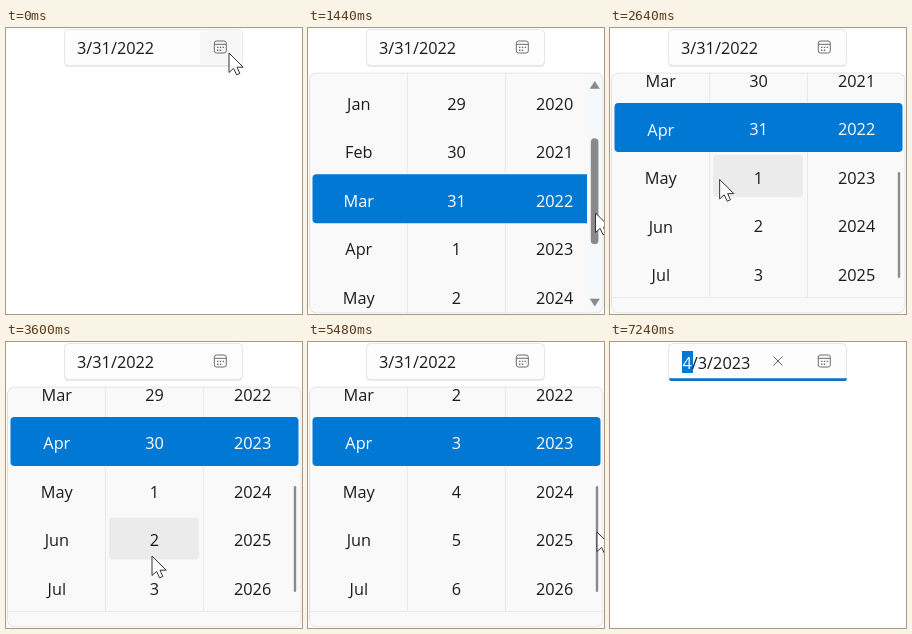
These frames come from a looping animation (296 px wide and 286 px high, 7.28 s). An HTML page:

```html
<!DOCTYPE html>
<html lang="en">
<head>
<meta charset="utf-8">
<title>Date picker</title>
<style>
  html, body { margin: 0; width: 100%; height: 100%; overflow: hidden; background: #fff; }
  svg { display: block; }
  text { font: 16.3px "Open Sans", "Noto Sans", sans-serif; }
  .mid { text-anchor: middle; }
  .line { stroke: #e9e9e9; fill: none; }
  .icon { stroke: #6a6a6a; fill: none; stroke-width: 1; }
</style>
</head>
<body>
<svg width="296" height="286" viewBox="0 0 296 286">
  <defs>
    <clipPath id="panelClip"><rect id="reveal" x="1" y="44.5" width="294.5" height="241" rx="7"/></clipPath>
    <clipPath id="rowsClip"><rect x="1" y="93" width="294" height="339.5"/></clipPath>
    <clipPath id="bandClip"><rect x="4.5" y="238" width="288" height="49" rx="4"/></clipPath>
  </defs>

  <rect x="58.5" y="2.5" width="178" height="36" rx="4" fill="#d6d6d6"/>
  <rect x="58.5" y="1.5" width="178" height="36" rx="4" fill="#fdfdfd" stroke="#e6e6e6"/>
  <rect id="iconHover" x="194" y="3" width="41" height="33" rx="3" fill="#f7f7f7"/>
  <g id="idleField"><text x="71" y="26" fill="#1b1b1b">3/31/2022</text></g>
  <g id="editField">
    <path d="M59 36.2H237Q237 39 234 39H62Q59 39 59 36.2Z" fill="#0b74cc"/>
    <rect x="72" y="9" width="11" height="22" fill="#0078d4"/>
    <text x="72.5" y="26.5" fill="#1b1b1b"><tspan fill="#fff">4</tspan>/3/2023</text>
    <path class="icon" d="M163.5 14.5l9 9m0-9l-9 9"/>
  </g>
  <g class="icon">
    <rect x="208.3" y="13" width="12" height="12" rx="2.2"/>
    <path d="M208.3 16.3h12"/>
    <path d="M211 19.4h7.4M211 22.2h5" stroke-width="1.4" stroke-dasharray="1.4 1.4"/>
  </g>

  <g id="popup" clip-path="url(#panelClip)">
    <rect x="1" y="44" width="295" height="242" fill="#f9f9f9"/>
    <g id="content">
      <g class="mid" fill="#1b1b1b">
        <text x="50.8" y="75.3">Month</text><text x="148.5" y="75.3">Day</text><text x="246.6" y="75.3">Year</text>
      </g>
      <path class="line" d="M1 92.5H295M99.5 93V432M197.5 93V432M1 432.5H295"/>
      <rect id="hover" rx="4" fill="#ebebeb"/>
      <g clip-path="url(#rowsClip)"><g id="darkRows" class="mid" fill="#1b1b1b"></g></g>
      <rect x="4.5" y="238" width="288" height="49" rx="4" fill="#0078d4"/>
      <g clip-path="url(#bandClip)"><g id="lightRows" class="mid" fill="#fff"></g></g>
      <path d="M67 456l5 5 10-10M217 451l10 10m0-10l-10 10" fill="none" stroke="#333" stroke-width="1.3"/>
    </g>
    <g id="rail">
      <rect x="279" y="45" width="17" height="241" fill="#f6f9fb"/>
      <path d="M282.2 60.5l4.6-7 4.6 7zM282.2 271l4.6 7 4.6-7z" fill="#8a8a8a" stroke="#8a8a8a" stroke-width=".6" stroke-linejoin="round"/>
    </g>
    <rect id="thumb" height="106" fill="#8a8a8a"/>
    <rect id="frame" x="1.5" y="45" width="293.5" height="240" rx="7" fill="none" stroke="#e0e0e0"/>
  </g>

  <path id="cursor" d="M0 0V19.5L4.6 15.4 7.6 21.8 10.8 20.4 8 14.2H14.2Z"
        fill="#fff" stroke="#333" stroke-linejoin="round"/>
</svg>
<script>
  const LOOP = 7280, ROW = 48.5, BAND = 238.5;
  const MONTHS = "Jan Feb Mar Apr May Jun Jul Aug Sep Oct Nov Dec".split(" ");
  const $ = id => document.getElementById(id);
  const mod = (a, n) => ((a % n) + n) % n;
  const linear = p => p;
  const smooth = p => p * p * (3 - 2 * p);
  const easeOut = p => 1 - (1 - p) ** 3;
  const show = (id, on) => $(id).setAttribute("display", on ? "inline" : "none");
  const set = (id, attrs) => {
    for (const k in attrs) $(id).setAttribute(k, attrs[k]);
  };

  // Keys are [time, value]; the value holds before the first and after the last.
  function track(keys, t, ease = linear, col = 1) {
    if (t <= keys[0][0]) return keys[0][col];
    for (let i = 1; i < keys.length; i++) {
      const a = keys[i - 1], b = keys[i];
      if (t < b[0]) return a[col] + (b[col] - a[col]) * ease((t - a[0]) / (b[0] - a[0]));
    }
    return keys[keys.length - 1][col];
  }

  const POINTER = [
    [120, 223, 25], [240, 216, 22], [480, 216, 22], [900, 289, 145], [1160, 289, 145],
    [1440, 287.5, 185], [1760, 287.5, 212.5], [1900, 288, 213], [2360, 54, 152], [2520, 54, 152],
    [2860, 246, 150], [3120, 246, 150], [3540, 146, 214], [3680, 146, 214],
    [3920, 146, 214], [4080, 147, 246], [4740, 147, 246], [5440, 289, 190], [5540, 289, 190],
    [5760, 289, 206], [5860, 289, 206], [6300, 74, 258], [6640, 74, 258], [7080, -20, 290]
  ];
  const SCROLL = [[1160, 0], [1440, 91.5], [1760, 161], [1840, 163], [5540, 163], [5760, 194]];
  const MONTH = [[2420, 2], [2680, 3]];
  const YEAR = [[2900, 2022], [3160, 2023]];
  const DAY = [[4240, 29], [4680, 32]];

  const COLUMNS = [50.8, 148.5, 246.6];
  const cells = ["darkRows", "lightRows"].map(id => COLUMNS.map(x =>
    Array.from({ length: 9 }, () => {
      const cell = document.createElementNS("http://www.w3.org/2000/svg", "text");
      cell.setAttribute("x", x);
      return $(id).appendChild(cell);
    })));

  function drawColumn(col, position, label) {
    const base = Math.round(position);
    for (const layer of cells) {
      layer[col].forEach((cell, k) => {
        const item = base + k - 4;
        cell.textContent = label(item);
        cell.setAttribute("y", BAND + 31.9 + (item - position) * ROW);
      });
    }
  }

  function drawHover(x, y, scroll) {
    const row = Math.floor((y + scroll - BAND) / ROW);
    const inside = x > 4 && x < 279 && y > 45 && row >= -3 && row <= 4 && row !== 0;
    show("hover", inside);
    if (!inside) return;
    const footer = row === 4;
    set("hover", {
      x: footer ? (x < 148 ? 5 : 152) : 5 + 98 * Math.floor((x - 1) / 98),
      y: BAND + row * ROW + 3,
      width: footer ? 140 : 90,
      height: 42
    });
  }

  function draw(t) {
    const x = track(POINTER, t, smooth), y = track(POINTER, t, smooth, 2);
    const scroll = track(SCROLL, t);
    const open = t >= 280 && t < 6640;
    const done = t >= 6600;

    set("cursor", { transform: `translate(${x} ${y})` });
    show("cursor", t < 7080);
    show("iconHover", t < 500);
    show("idleField", !done);
    show("editField", done);
    show("popup", open);
    if (!open) return;

    const height = 241 * track([[280, .25], [480, 1]], t, easeOut);
    set("reveal", { height });
    set("frame", { height: height - 1 });
    set("popup", { opacity: track([[6560, 1], [6640, 0]], t) });
    set("content", { transform: `translate(0 ${-scroll})` });
    drawHover(x, y, scroll);

    const longMonth = t < MONTH[1][0];
    const days = longMonth ? 31 : 30;
    drawColumn(0, track(MONTH, t, easeOut), i => MONTHS[mod(i, 12)]);
    drawColumn(1, longMonth ? 30 : track(DAY, t, easeOut), i => mod(i, days) + 1);
    drawColumn(2, track(YEAR, t, easeOut), i => i);

    const wide = (t > 860 && t < 2200) || (t > 5500 && t < 6100);
    show("rail", wide);
    set("thumb", {
      x: wide ? 282.8 : 287.8,
      y: 67 + scroll * .472,
      width: wide ? 7.6 : 2.4,
      rx: wide ? 3.8 : 1.2
    });
  }

  const start = performance.now();
  function tick() {
    draw((performance.now() - start) % LOOP);
    requestAnimationFrame(tick);
  }
  tick();
</script>
</body>
</html>
```
